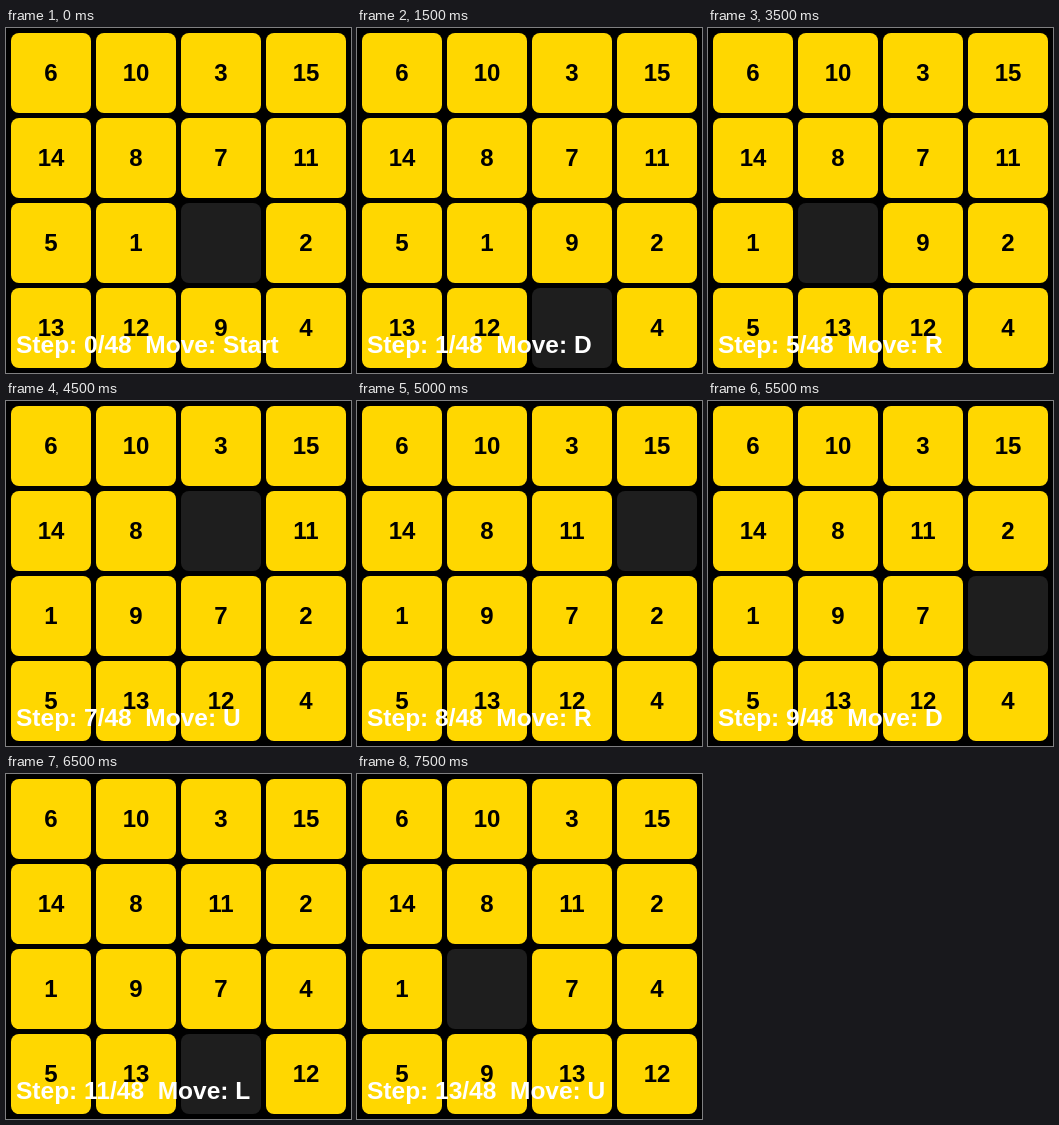
These frames come from a looping animation (345x345 px, 8 s). An HTML page:

```html
<!DOCTYPE html>
<html lang="en">
<head>
<meta charset="utf-8">
<title>Fifteen puzzle</title>
<style>
  html, body { margin: 0; width: 100%; height: 100%; overflow: hidden; background: #000; }
  svg { display: block; width: 345px; height: 345px; }
  text { font: bold 24px "Liberation Sans", Arial, sans-serif; font-kerning: normal; white-space: pre; }
  .tile { text-anchor: middle; fill: #000; }
  .status { font-size: 24.5px; fill: #fff; }
</style>
</head>
<body>
<svg id="stage" viewBox="0 0 345 345"></svg>
<script>
const START = [6, 10, 3, 15, 14, 8, 7, 11, 5, 1, 0, 2, 13, 12, 9, 4];
const MOVES = "DLLURRURDDLLU"; // directions the gap travels
const SHIFT = { U: -4, D: 4, L: -1, R: 1 };
const TOTAL = 48, SIZE = 80, GAP = 5;
const FIRST = 1500, STEP = 500, LOOP = 8000;

const stage = document.getElementById("stage");

function add(tag, attrs) {
  const el = document.createElementNS("http://www.w3.org/2000/svg", tag);
  for (const key in attrs) el.setAttribute(key, attrs[key]);
  return stage.appendChild(el);
}

const cells = START.map((_, i) => {
  const x = GAP + (i % 4) * (SIZE + GAP);
  const y = GAP + Math.floor(i / 4) * (SIZE + GAP);
  return {
    box: add("rect", { x, y, width: SIZE, height: SIZE, rx: 8 }),
    label: add("text", { class: "tile", x: x + SIZE / 2, y: y + 48 })
  };
});
const status = add("text", { class: "status", x: 10, y: 325 });

function boardAt(step) {
  const board = START.slice();
  let gap = board.indexOf(0);
  for (const move of MOVES.slice(0, step)) {
    const next = gap + SHIFT[move];
    board[gap] = board[next];
    board[next] = 0;
    gap = next;
  }
  return board;
}

function draw(step) {
  boardAt(step).forEach((n, i) => {
    cells[i].box.setAttribute("fill", n ? "#ffd700" : "#1e1e1e");
    cells[i].label.textContent = n || "";
  });
  const move = step ? MOVES[step - 1] : "Start";
  status.textContent = `Step: ${step}/${TOTAL}  Move: ${move}`;
}

let shown = -1;
const origin = performance.now();
function tick() {
  const t = (performance.now() - origin) % LOOP;
  const step = t < FIRST ? 0 : 1 + Math.floor((t - FIRST) / STEP);
  if (step !== shown) draw(shown = step);
  requestAnimationFrame(tick);
}
tick();
</script>
</body>
</html>
```
